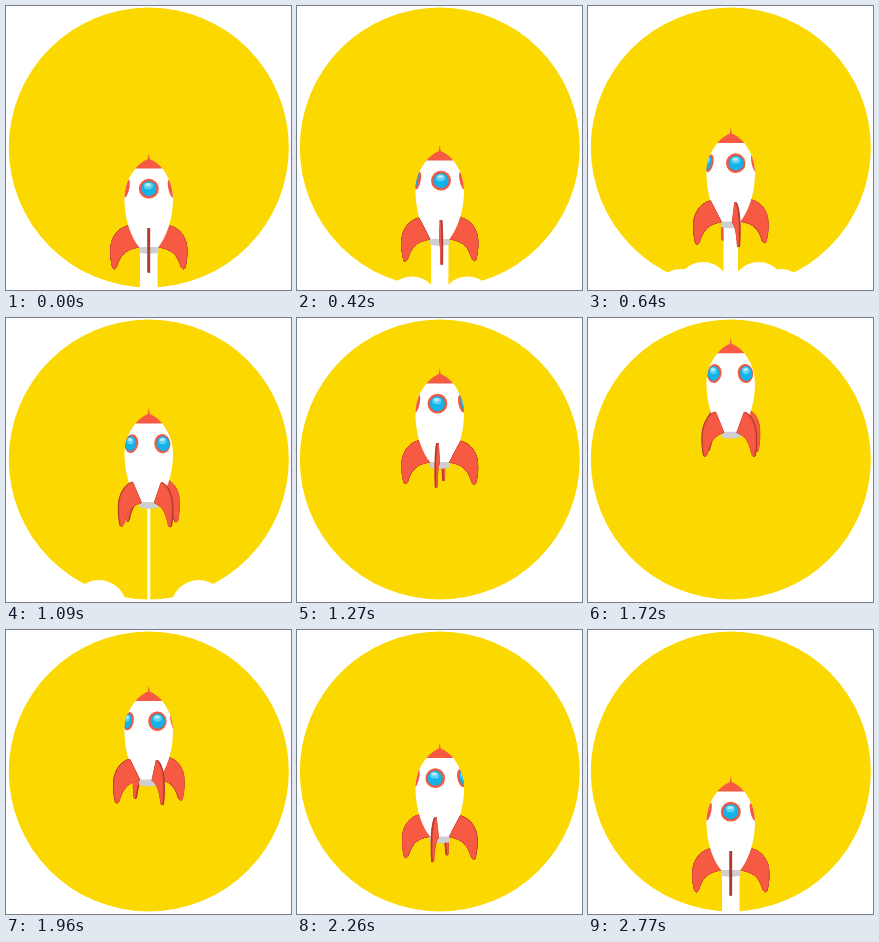
Write an HTML page with a canvas that moves like this. It is 285 by 284 pixels and loops after 2800 ms.

```html
<!DOCTYPE html>
<html lang="en">
<head>
<meta charset="utf-8">
<title>Rocket</title>
<style>
  html, body { margin: 0; width: 100%; height: 100%; overflow: hidden; background: #fff; }
  canvas { display: block; }
</style>
</head>
<body>
<canvas id="stage" width="285" height="284"></canvas>
<script>
const ctx = document.getElementById('stage').getContext('2d');
const YELLOW = '#fbd800', RED = '#f75a43', DARK = '#b23a32', GREY = '#cfcfd1';
const AXIS = 142.8, TILT = 0.1, STEPS = 60, LOOP = 2800;

// Keyframes as [step, value]
const lift = [[0, 0], [8, -25.5], [13, -57], [19, -97], [26, -130.5], [30, -135], [37, -116],
  [42, -91.5], [52, -34.5], [55, -17], [59, -1], [60, 0]];
const spin = [[0, 0], [8, 13], [13, 38], [26, 145], [42, 293], [52, 348], [59, 360], [60, 360]];
const trailWidth = [[0, 17.5], [8, 14.5], [13, 3], [14, 0], [55, 0], [59, 17.5], [60, 17.5]];
const innerPuff = [[0, 312], [8, 283], [13, 312], [60, 312]];
const outerPuff = [[0, 322], [8, 291], [13, 290], [18, 318], [60, 318]];

const body = new Path2D('M130 162C122 171 118 182 118.5 195C119 215 125 231 133 241H152.5' +
  'C160 231 166.5 215 167 195C167.5 182 163 171 156 162Z');
const cone = new Path2D('M142.7 147L143.7 153Q151 156 156.3 162.5H129.3Q135 156 141.8 153Z');
const nozzle = new Path2D('M133 240H152.5V246.5Q143 249 133 246.5Z');

const slope = (a, b) => (b[1] - a[1]) / (b[0] - a[0]);

// Smooth curve through the keys, flat at turning points
function sample(keys, x) {
  const i = Math.min(keys.findIndex(k => k[0] > x), keys.length - 1) - 1;
  const tangent = j => {
    if (j === 0 || j === keys.length - 1) return 0;
    const before = slope(keys[j - 1], keys[j]), after = slope(keys[j], keys[j + 1]);
    return before * after <= 0 ? 0 : (before + after) / 2;
  };
  const [x0, y0] = keys[i], [x1, y1] = keys[i + 1];
  const w = x1 - x0, u = (x - x0) / w, v = 1 - u;
  return y0 * v * v * (1 + 2 * u) + y1 * u * u * (3 - 2 * u) +
    w * u * v * (tangent(i) * v - tangent(i + 1) * u);
}

function stepAt(ms) {
  let step = 0;
  for (let end = 0; step < STEPS; step++) {
    const slow = (step < 13 && step % 2 === 0) || (step > 55 && step < 59);
    end += slow ? 130 : 30;
    if (ms < end) break;
  }
  return Math.min(step, STEPS - 1);
}

function ellipse(x, y, rx, ry, color, turn = 0) {
  ctx.beginPath();
  ctx.ellipse(x, y, rx, ry, turn, 0, 7);
  ctx.fillStyle = color;
  ctx.fill();
}

function fill(path, color) {
  ctx.fillStyle = color;
  ctx.fill(path);
}

function drawFin(angle) {
  const s = Math.sin(angle), c = Math.cos(angle);
  const outline = side => {
    const p = (r, y) => [AXIS + r * s + side * c, y + (r * c - side * s) * TILT];
    const path = new Path2D();
    path.moveTo(...p(21, 220));
    path.bezierCurveTo(...p(31, 222), ...p(38, 232), ...p(38, 243));
    path.bezierCurveTo(...p(38.4, 250), ...p(37.5, 256), ...p(36, 262));
    path.quadraticCurveTo(...p(34.5, 264.5), ...p(32.5, 261));
    path.bezierCurveTo(...p(29, 250), ...p(24, 243), ...p(10, 241));
    path.closePath();
    return path;
  };
  ctx.strokeStyle = DARK;
  ctx.lineWidth = 0.9;
  for (let side = -0.8; side <= 0.81; side += 0.4) {
    const path = outline(side);
    fill(path, DARK);
    ctx.stroke(path);
  }
  if (Math.abs(s) > 0.05) {
    const face = outline(-Math.sign(s) * 0.8);
    fill(face, RED);
    ctx.lineWidth = 0.7;
    ctx.strokeStyle = RED;
    ctx.stroke(face);
  }
}

function drawWindow(angle) {
  const s = Math.sin(angle), c = Math.cos(angle);
  if (c < -0.45) return;
  const side = Math.sign(s), turn = s * -0.22;
  const x = AXIS + (c < 0 ? side * (22 - 5 * c) : 22 * s);
  const y = 182.7;
  ellipse(x, y, 10 * Math.max(c, 0) + 2.4 * s * s * (1 - Math.max(c, 0)), 9.9 - 0.8 * s * s, RED, turn);
  if (c < 0.03) return;
  const rx = 7.4 * c ** 0.7, bx = x + s;
  ellipse(bx, y, rx + 0.5, 7.9, '#8c7480', turn);
  ellipse(bx, y, rx, 7.2, '#12b3e8', turn);
  ellipse(bx - rx * 0.05, y - 2.8, rx * 0.62, 3.4, '#5fd0f4', turn);
  ellipse(bx - rx * 0.1, y - 4, rx * 0.38, 1.6, '#b4ebfb', turn);
}

function drawRocket(step) {
  const turn = sample(spin, step) * Math.PI / 180;
  const angles = [0, 1, 2, 3].map(i => turn + i * Math.PI / 2)
    .sort((a, b) => Math.cos(a) - Math.cos(b));
  const isFront = a => Math.cos(a) > 0.001;
  const y = sample(lift, step), width = sample(trailWidth, step);

  ctx.save();
  ctx.translate(0, y);
  angles.filter(a => !isFront(a)).forEach(drawFin);
  ctx.fillStyle = '#fff';
  if (width > 0) ctx.fillRect(AXIS - width / 2, 246, width, 200);
  fill(nozzle, GREY);
  fill(body, '#fff');
  ctx.save();
  ctx.clip(body);
  angles.forEach(drawWindow);
  ctx.restore();
  fill(cone, RED);
  angles.filter(isFront).forEach(drawFin);
  ctx.restore();
}

function draw(step) {
  ctx.fillStyle = '#fff';
  ctx.fillRect(0, 0, 285, 284);
  ellipse(142.8, 141.5, 140, 140, YELLOW);
  for (const side of [-1, 1]) {
    ellipse(AXIS + side * 27.8, sample(innerPuff, step), 27, 27, '#fff');
    ellipse(AXIS + side * 50, sample(outerPuff, step), 28, 28, '#fff');
  }
  drawRocket(step);
}

const start = performance.now();
function tick() {
  draw(stepAt((performance.now() - start) % LOOP));
  requestAnimationFrame(tick);
}
tick();
</script>
</body>
</html>
```
